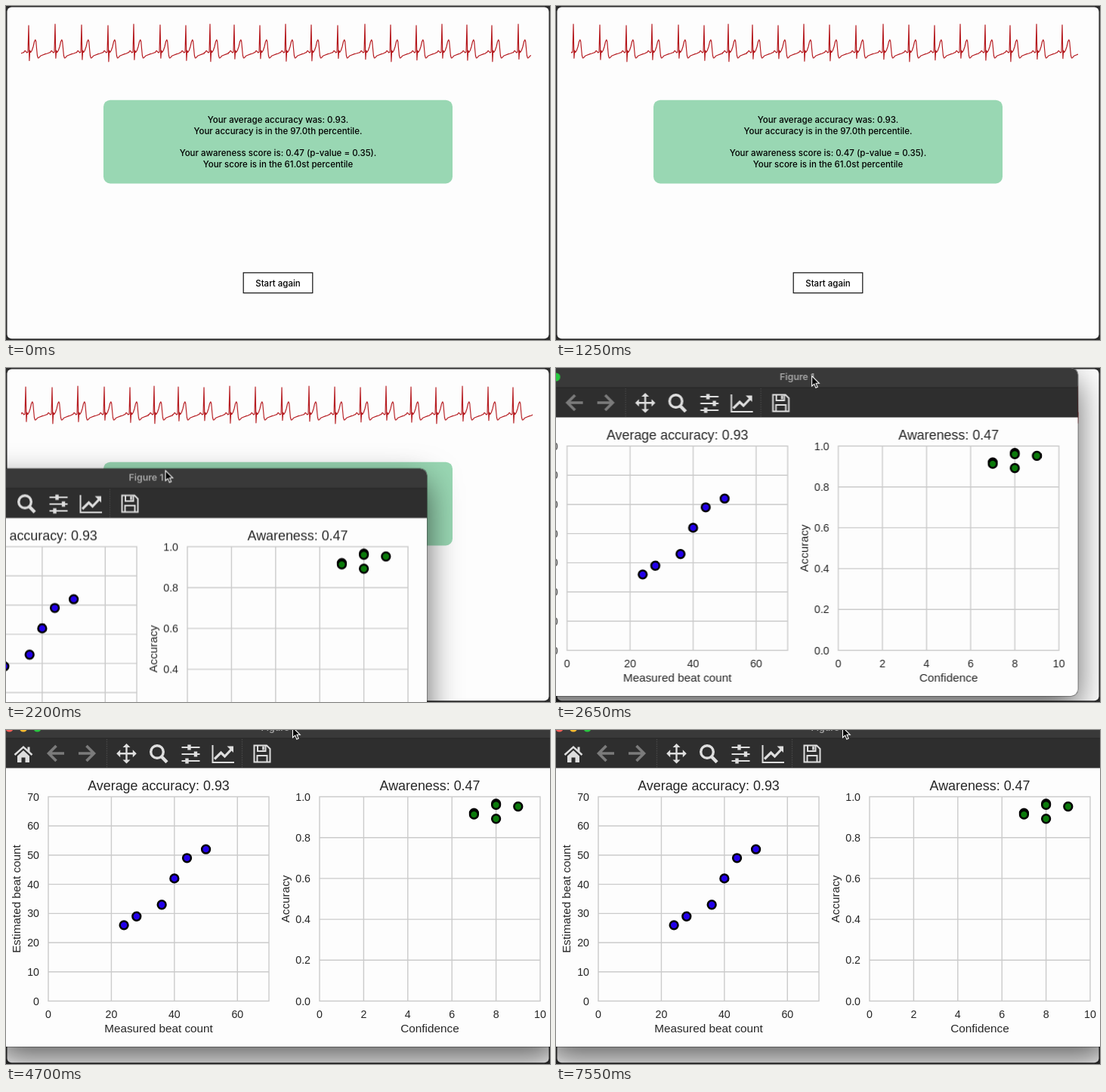
Write an HTML page that moves like this. It is 720x443 px and loops after 7.6 s.

```html
<!DOCTYPE html>
<html lang="en">
<head>
<meta charset="utf-8">
<title>Heartbeat results</title>
<style>
  html, body { margin: 0; width: 100%; height: 100%; overflow: hidden; background: #2c2c2c; }
  #stage { position: relative; width: 720px; height: 443px; overflow: hidden; background: #2c2c2c; }
  svg { display: block; }
  .page text { font: 500 11.5px Inter, "Open Sans", sans-serif; text-anchor: middle; fill: #000; }
  .trace { fill: none; stroke: #b4161b; stroke-width: 1.15; stroke-linejoin: round; }
  .scroll { animation: scroll 7.6s linear infinite; }
  .cover { fill: #fdfdfd; animation: chunk 7.6s steps(27) -70ms infinite; }

  .window {
    position: absolute; left: -13px; top: -15px; width: 744.5px; height: 435px;
    border-radius: 9px; overflow: hidden; background: #fdfdfd;
    box-shadow: 0 0 0 .6px rgba(0, 0, 0, .6), 0 17px 44px rgba(0, 0, 0, .62);
    animation: drag 7.6s linear infinite;
  }
  .cursor { position: absolute; left: 378px; top: -5px; animation: point 7.6s linear infinite; }
  .caption { font: 600 12.3px Inter, "Open Sans", sans-serif; fill: #a6a6a6; }
  .icons { fill: none; stroke: #dedede; stroke-width: 2.4; }
  .icons .solid { fill: #dedede; stroke: none; }
  .icons .dim { stroke: #7b7b7b; stroke-width: 3.6; }
  .icons .split { stroke: #484848; stroke-width: 1.2; stroke-dasharray: 1.5 1.5; }
  .plot { font-family: "Liberation Sans", Arial, sans-serif; fill: #262626; }
  .plot text { text-anchor: middle; font-size: 15.3px; }
  .plot .tick { font-size: 14.2px; }
  .plot .end { text-anchor: end; }
  .plot .head { font-size: 17.9px; }
  .grid { fill: none; stroke: #cbcbcb; stroke-width: 1.4; }
  .dot { stroke: #000; stroke-width: 2.5; }

  @keyframes scroll { to { transform: translateX(-255.4px); } }
  @keyframes chunk { to { transform: translateX(256.5px); } }
  @keyframes drag {
    0%, 23.03% { transform: translate(-720px, 620px); }
    24.342% { transform: translate(-551px, 465px); animation-timing-function: cubic-bezier(.33, .46, .67, .81); }
    28.947% { transform: translate(-175.5px, 149px); animation-timing-function: cubic-bezier(.33, .6, .67, .92); }
    34.868% { transform: translate(-41.5px, 15px); animation-timing-function: cubic-bezier(.33, .3, .6, 1); }
    41.447%, 100% { transform: none; }
  }
  @keyframes point {
    0%, 23.03% { transform: translate(-710px, 610px); }
    24.342% { transform: translate(-540px, 452px); animation-timing-function: cubic-bezier(.33, .46, .67, .81); }
    28.947% { transform: translate(-169px, 140px); animation-timing-function: cubic-bezier(.33, .6, .67, .92); }
    34.868% { transform: translate(-41px, 14px); animation-timing-function: cubic-bezier(.33, .3, .6, 1); }
    41.447%, 100% { transform: none; }
  }
</style>
</head>
<body>
<div id="stage">
  <svg class="page" width="720" height="443">
    <rect x="1.5" y="1.5" width="717" height="439.7" rx="6" fill="#fdfdfd"/>
    <svg x="20" y="10" width="695" height="80" viewBox="20 10 695 80">
      <g class="scroll">
        <path class="trace" id="trace"/>
        <rect class="cover" x="695" y="10" width="400" height="80"/>
      </g>
    </svg>
    <rect x="129" y="124.7" width="462" height="110.8" rx="9" fill="#99d7b3"/>
    <text x="360" y="155.3">Your average accuracy was: 0.93.</text>
    <text x="360" y="170">Your accuracy is in the 97.0th percentile.</text>
    <text x="360" y="199.3">Your awareness score is: 0.47 (p-value = 0.35).</text>
    <text x="360" y="214">Your score is in the 61.0st percentile</text>
    <rect x="314.2" y="353.8" width="91.6" height="26.8" fill="#fff" stroke="#111" stroke-width="1.2"/>
    <text x="360" y="371.6">Start again</text>
  </svg>

  <div class="window">
    <svg width="744.5" height="435" viewBox="-13 -15 744.5 435">
      <rect x="-13" y="-15" width="745" height="26" fill="#393939"/>
      <rect x="-13" y="11" width="745" height="39.5" fill="#2e2e2e"/>
      <path d="M-13 11H732" stroke="#242424"/>
      <circle cx="4.5" cy="-3" r="5.5" fill="#ff5f57"/>
      <circle cx="23" cy="-3" r="5.5" fill="#febc2e"/>
      <circle cx="41.5" cy="-3" r="5.5" fill="#28c840"/>
      <text class="caption" x="337.5" y="1.3">Figure 1</text>
      <g class="icons">
        <path d="M11.5 33L23 22.5L34.5 33"/>
        <path class="solid" d="M15 34.5L23 27L31 34.5V43H25.5V36.5H20.5V43H15ZM28.5 22.5H31.5V30L28.5 27Z"/>
        <path class="dim" d="M77 31H57M66.5 21L56.5 31L66.5 41"/>
        <path class="dim" d="M96 31H116M106.5 21L116.5 31L106.5 41"/>
        <path class="split" d="M133.5 12V50M312.5 12V50"/>
        <path d="M149 31.3H170M159.5 21V42"/>
        <path class="solid" id="tips"/>
        <circle cx="200" cy="29" r="8.3" stroke-width="3.4"/>
        <path d="M206 35.5L213 42.8" stroke-width="4.4"/>
        <path d="M232.5 23H256.5M232.5 32H256.5M232.5 41H256.5" stroke-width="2"/>
        <path d="M242.5 19.5V26.5M251 28.5V35.5M239.5 37.5V44.5" stroke-width="4.4"/>
        <path d="M273.5 20V43H302" stroke-width="2"/>
        <path d="M276 38.5L284.5 30L289.5 35L298 26" stroke-width="3.2"/>
        <path class="solid" d="M292.5 21.5H301V30Z"/>
        <path d="M328.5 20.5H345L349.5 25V42.5H328.5ZM333 20.5V28H343.5V20.5M332.5 42.5V34H345.5V42.5" stroke-width="2"/>
        <path d="M340.5 21.5V26.5" stroke-width="2.6"/>
      </g>
      <g class="plot" id="plots"></g>
    </svg>
  </div>

  <svg class="cursor" width="14" height="20" viewBox="-1 -1 14 20">
    <path d="M.5 .5V14L3.7 11.1L5.8 16.2L8.1 15.2L6 10.3H10.2Z" fill="#000" stroke="#fff" stroke-width="1.1"/>
  </svg>
</div>
<script>
  const byId = id => document.getElementById(id);

  // Heart trace: one beat shape placed at slightly uneven intervals
  const beats = [-5, 30, 65, 100, 135, 169, 204, 238, 270, 302, 336, 370, 404,
    439, 475, 509, 543, 577, 610, 643, 678, 712, 745, 779, 813, 847, 881, 915, 949];
  const beat = (x, i) => [
    [-8, 62], [-6.5, 61.6], [-5, 59.3], [-3.7, 60.2], [-2.4, 62], [-1, 61],
    [0, 25 + Math.sin(i * 2.1)], [.9, 71.5 + 2.3 * Math.sin(i * 1.7 + 1)],
    [1.7, 59], [2.7, 61.5], [4.3, 59], [6, 54], [7.6, 47], [8.8, 44.8], [9.7, 47],
    [10.6, 57], [11.4, 65.5], [12.4, 69], [13.6, 68.7], [15.5, 66.3], [18.5, 65], [22, 63.6], [24.5, 63]
  ].map(([dx, y]) => `${x + dx} ${y.toFixed(1)}`).join("L");
  byId("trace").setAttribute("d", "M" + beats.map(beat).join("L"));

  // Four arrow tips of the move icon
  const tip = ([dx, dy]) => {
    const at = (a, b) => `${159.5 + dx * a - dy * b} ${31.3 + dy * a + dx * b}`;
    return `M${at(13.3, 0)}L${at(8.3, 5)}L${at(8.3, -5)}Z`;
  };
  byId("tips").setAttribute("d", [[1, 0], [-1, 0], [0, 1], [0, -1]].map(tip).join(""));

  // Scatter plots
  const TOP = 88.5, BASE = 359.5, WIDTH = 292;
  const range = (max, step) => Array.from({ length: Math.floor(max / step + 1.001) }, (_, i) => i * step);

  function plot({ left, title, xLabel, yLabel, labelX, xMax, xStep, yMax, yStep, digits, fill, points }) {
    const px = v => left + v / xMax * WIDTH;
    const py = v => BASE - v / yMax * (BASE - TOP);
    const mid = left + WIDTH / 2, midY = (TOP + BASE) / 2;
    const xs = range(xMax, xStep), ys = range(yMax, yStep);
    const lines = xs.map(v => `M${px(v)} ${TOP}V${BASE}`).concat(ys.map(v => `M${left} ${py(v)}h${WIDTH}`));
    return `<path class="grid" d="${lines.join("")}M${left} ${TOP}h${WIDTH}V${BASE}H${left}Z"/>` +
      xs.map(v => `<text class="tick" x="${px(v)}" y="382.3">${v}</text>`).join("") +
      ys.map(v => `<text class="tick end" x="${left - 12}" y="${py(v) + 5}">${v.toFixed(digits)}</text>`).join("") +
      `<text class="head" x="${mid}" y="80.3">${title}</text>` +
      `<text x="${mid}" y="401">${xLabel}</text>` +
      `<text transform="translate(${labelX} ${midY}) rotate(-90)">${yLabel}</text>` +
      points.map(([x, y]) => `<circle class="dot" cx="${px(x)}" cy="${py(y)}" r="5.4" fill="${fill}"/>`).join("");
  }

  byId("plots").innerHTML = plot({
    left: 56, title: "Average accuracy: 0.93", xLabel: "Measured beat count",
    yLabel: "Estimated beat count", labelX: 19, xMax: 70, xStep: 20, yMax: 70, yStep: 10,
    digits: 0, fill: "#2200e8",
    points: [[24, 26], [28, 29], [36, 33], [40, 42], [44, 49], [50, 52]]
  }) + plot({
    left: 415, title: "Awareness: 0.47", xLabel: "Confidence",
    yLabel: "Accuracy", labelX: 375, xMax: 10, xStep: 2, yMax: 1, yStep: .2,
    digits: 1, fill: "#0b7a0b",
    points: [[7, .92], [7, .913], [8, .966], [8, .96], [8, .892], [9, .952]]
  });
</script>
</body>
</html>
```
